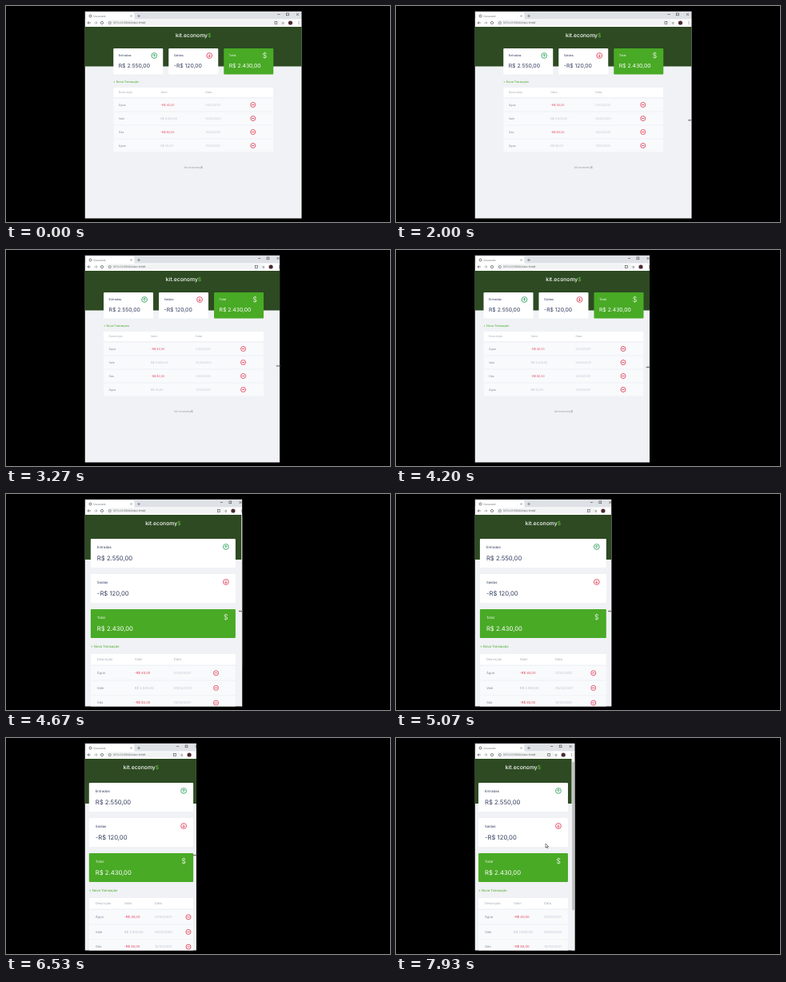
An HTML page with a canvas for the animation above (8000 ms loop, 480 by 270 pixels).

```html
<!DOCTYPE html>
<html lang="pt-BR">
<head>
<meta charset="utf-8">
<title>Document</title>
<style>
html, body { margin: 0; height: 100%; overflow: hidden; background: #000; }
canvas { display: block; }
</style>
</head>
<body>
<canvas id="stage" width="480" height="270"></canvas>
<script>
const ctx = document.getElementById('stage').getContext('2d');
const LOOP = 8000, STEP = 200 / 3, LEFT = 98.5, TOP = 6.5, BOTTOM = 265.5;
const INK = '#363f5f', GREEN = '#49aa26', RED = '#e0455c', GREY = '#a3a8b5';

// time, visible right edge, right edge of the page layout (trails while dragging)
const EDGE = [
  [0, 369.5, 370], [2000, 369.5, 370], [2800, 354.5, 357], [3270, 342, 345.5],
  [3670, 335, 338], [4200, 317, 320.5], [4530, 304, 307], [5070, 269, 273.2],
  [5400, 262, 266], [6270, 250.5, 254], [6530, 238, 243.7], [7130, 224.5, 226],
  [7470, 223.5, 223.7]
];
// time, x, y of the arrow pointer
const ENTER = [[130, 309, 169], [870, 309, 169], [1000, 366, 142]];
const LEAVE = [[7200, 221, 146], [7470, 213, 146], [7670, 213, 146], [7930, 187, 132]];

const ROWS = [
  ['Água', '-R$ 40,00', '01/02/2021'],
  ['Vale', 'R$ 2.500,00', '05/02/2021'],
  ['Gás', '-R$ 80,00', '10/02/2021'],
  ['Água', 'R$ 50,00', '17/02/2021']
];
const CARDS = [['Entradas', 'R$ 2.550,00'], ['Saídas', '-R$ 120,00'], ['Total', 'R$ 2.430,00']];

function at(t, keys) {
  let i = keys.findIndex(k => k[0] > t);
  if (i < 0) return keys[keys.length - 1].slice(1);
  if (i === 0) return keys[0].slice(1);
  const a = keys[i - 1], b = keys[i], u = (t - a[0]) / (b[0] - a[0]);
  return a.slice(1).map((v, n) => v + (b[n + 1] - v) * u);
}

function box(x, y, w, h, color, r = 0) {
  ctx.fillStyle = color;
  ctx.beginPath();
  ctx.roundRect(x, y, w, h, r);
  ctx.fill();
}

function text(s, x, y, size, color, weight = 400) {
  ctx.font = `${weight} ${size}px Inter, sans-serif`;
  ctx.fillStyle = color;
  ctx.fillText(s, x, y + size * 0.36);
  return ctx.measureText(s).width;
}

function line(color, width, ...paths) {
  ctx.strokeStyle = color;
  ctx.lineWidth = width;
  ctx.beginPath();
  for (const p of paths)
    for (let i = 0; i < p.length; i += 2) ctx[i ? 'lineTo' : 'moveTo'](p[i], p[i + 1]);
  ctx.stroke();
}

function ring(x, y, r, color, width) {
  ctx.strokeStyle = color;
  ctx.lineWidth = width;
  ctx.beginPath();
  ctx.arc(x, y, r, 0, 7);
  ctx.stroke();
}

function logo(cx, y, size, color, accent, weight) {
  const name = 'kit.economy';
  ctx.font = `${weight} ${size}px Inter, sans-serif`;
  const x = cx - ctx.measureText(name + '$').width / 2;
  const w = text(name, x, y, size, color, weight);
  text('$', x + w, y, size, accent, weight);
}

function chrome(right) {
  const dark = '#5f6368';
  box(LEFT, TOP, 290, 10.5, '#dee1e6');
  box(LEFT + 1, 8, 61, 10, '#fff', 2);
  box(LEFT, 16.5, 290, 9.5, '#fff');
  ring(105.5, 12.5, 1.5, dark, 0.9);
  text('Document', 109.5, 12.5, 3.1, dark);
  line(dark, 0.6, [155.5, 11.5, 157.5, 13.5], [157.5, 11.5, 155.5, 13.5],
    [164.2, 12.5, 167.8, 12.5], [166, 10.7, 166, 14.3]);
  const c = right - 5.5;
  line('#444', 0.6, [c - 25, 10.5, c - 22, 10.5], [c - 1.5, 9, c + 1.5, 12],
    [c + 1.5, 9, c - 1.5, 12]);
  ctx.strokeRect(c - 14, 9, 2.8, 2.8);

  line(dark, 0.8, [105.8, 21, 102, 21], [103.6, 19.4, 102, 21, 103.6, 22.6]);
  line('#a5a8ac', 0.8, [110.2, 21, 114, 21], [112.4, 19.4, 114, 21, 112.4, 22.6]);
  ring(120, 21, 1.6, dark, 0.8);
  box(126, 17.5, right - 25 - 126, 7, '#f1f3f4', 3.5);
  ring(129.8, 21, 1.5, dark, 0.6);
  text('127.0.0.1:5500/index.html#', 134, 21, 3.25, '#555');
  const m = right - 14.5;
  ctx.strokeStyle = dark;
  ctx.lineWidth = 0.7;
  ctx.strokeRect(m - 19.5, 19.5, 2.8, 2.8);
  text('☆', m - 11.5, 21, 4.5, dark);
  ctx.fillStyle = '#4a2a30';
  ctx.beginPath();
  ctx.arc(m, 21, 2.6, 0, 7);
  ctx.fill();
  for (const d of [-1.6, 0, 1.6]) box(right - 4.4, 20.6 + d, 0.8, 0.8, dark);
}

function card(i, x, y, w, h, narrow) {
  const total = i === 2, color = total ? '#fff' : INK;
  const pad = narrow ? 8 : 6.5, head = y + (narrow ? 10 : 9);
  box(x, y, w, h, total ? GREEN : '#fff', 1);
  text(CARDS[i][0], x + pad, head, narrow ? 4.3 : 3.8, color);
  text(CARDS[i][1], x + pad, y + (narrow ? 24 : 22), narrow ? 7.7 : 6.8, color);
  const ix = x + w - (narrow ? 12 : 11);
  if (total) {
    text('$', ix - 2.8, head, 9, '#fff', 300);
    return;
  }
  const tone = i ? RED : '#35a565', d = i ? 1 : -1;
  ring(ix, head, 3.4, tone, 0.9);
  line(tone, 0.9, [ix, head - 1.7, ix, head + 1.7],
    [ix - 1.5, head + 0.2 * d, ix, head + 1.7 * d, ix + 1.5, head + 0.2 * d]);
}

function table(x, w, narrow) {
  const extra = Math.max(w, 130) - 130;
  const cols = narrow
    ? [8, 44 + extra * 0.214, 82 + extra * 0.43, 124 + extra * 0.64]
    : [6.5, 59, 115, 174.5];
  const size = narrow ? 4.1 : 3.6, top = narrow ? 200 : 102;
  const headH = narrow ? 13.5 : 12, rowH = narrow ? 17.6 : 16, pitch = narrow ? 18.6 : 17;
  text('+ Nova Transação', x, narrow ? 191 : 95, narrow ? 4.15 : 3.7, GREEN);
  ctx.save();
  ctx.beginPath();
  ctx.rect(x, top, w, 200);
  ctx.clip();
  box(x, top, w, headH, '#fff', 1);
  ['Descrição', 'Valor', 'Data'].forEach((s, i) =>
    text(s, x + cols[i], top + headH / 2, size, GREY));
  ROWS.forEach(([name, value, date], i) => {
    const y = top + headH + 1.5 + i * pitch, mid = y + rowH / 2, ix = x + cols[3];
    box(x, y, w, rowH, '#f9fafc', 1);
    text(name, x + cols[0], mid, size, '#858a9c');
    text(value, x + cols[1], mid, size, value[0] === '-' ? RED : '#b9bdca');
    text(date, x + cols[2], mid, size, '#bfc3cf');
    ring(ix, mid, 3, RED, 0.9);
    line(RED, 0.9, [ix - 1.6, mid, ix + 1.6, mid]);
  });
  ctx.restore();
}

function page(right) {
  const narrow = right < LEFT + 200;
  const edge = right - (narrow ? 4.2 : 0), view = edge - LEFT;
  const w = Math.min(200, view * 0.925), cx = LEFT + view / 2, x = cx - w / 2;
  box(LEFT, 26, 290, 240, '#f0f2f5');
  box(LEFT, 26, 290, narrow ? 56 : 49.5, '#2d4a22');
  logo(cx, 36.5, 6.8, '#fff', '#5fb83c', 500);
  for (let i = 0; i < 3; i++) {
    if (narrow) card(i, x, 56 + 44 * i, w, 36, true);
    else card(i, x + (w + 7) / 3 * i, 53, (w - 14) / 3, 32.5, false);
  }
  table(x, w, narrow);
  if (narrow) {
    box(edge, 26, 4.2, 240, '#f1f1f1');
    box(edge + 0.6, 30, 3, 185, '#c1c1c1');
  } else logo(cx, 201.5, 3.6, '#9297a3', '#777c89', 400);
}

function arrow(x, y) {
  ctx.beginPath();
  [[0, 0], [0, 5], [1.2, 4], [2, 5.8], [2.8, 5.4], [2, 3.7], [3.6, 3.6]]
    .forEach(([a, b]) => ctx.lineTo(x + a, y + b));
  ctx.closePath();
  ctx.fillStyle = '#fff';
  ctx.fill();
  ctx.strokeStyle = '#333';
  ctx.lineWidth = 0.6;
  ctx.stroke();
}

function pointer(t, right) {
  if (t < 100) return;
  if (t < 1000) return arrow(...at(t, ENTER));
  if (t >= 7260) return arrow(...at(t, LEAVE));
  const x = right - 1.8, [y] = at(t, [[2000, 142.8], [4200, 146.5]]);
  line('#fff', 1.6, [x - 2, y, x + 2, y]);
  line('#444', 0.7, [x - 2, y, x + 2, y], [x - 1, y - 1, x - 2, y, x - 1, y + 1],
    [x + 1, y - 1, x + 2, y, x + 1, y + 1]);
}

function draw(now) {
  const t = Math.floor((now % LOOP + 5) / STEP) * STEP;
  const [shown, layout] = at(t, EDGE);
  ctx.textRendering = 'geometricPrecision';
  ctx.fillStyle = '#000';
  ctx.fillRect(0, 0, 480, 270);
  ctx.save();
  ctx.beginPath();
  ctx.rect(LEFT, TOP, shown - LEFT, BOTTOM - TOP);
  ctx.clip();
  page(layout);
  chrome(layout);
  ctx.restore();
  pointer(t, shown);
}

const start = performance.now();
function tick() {
  draw(performance.now() - start);
  requestAnimationFrame(tick);
}
tick();
</script>
</body>
</html>
```
